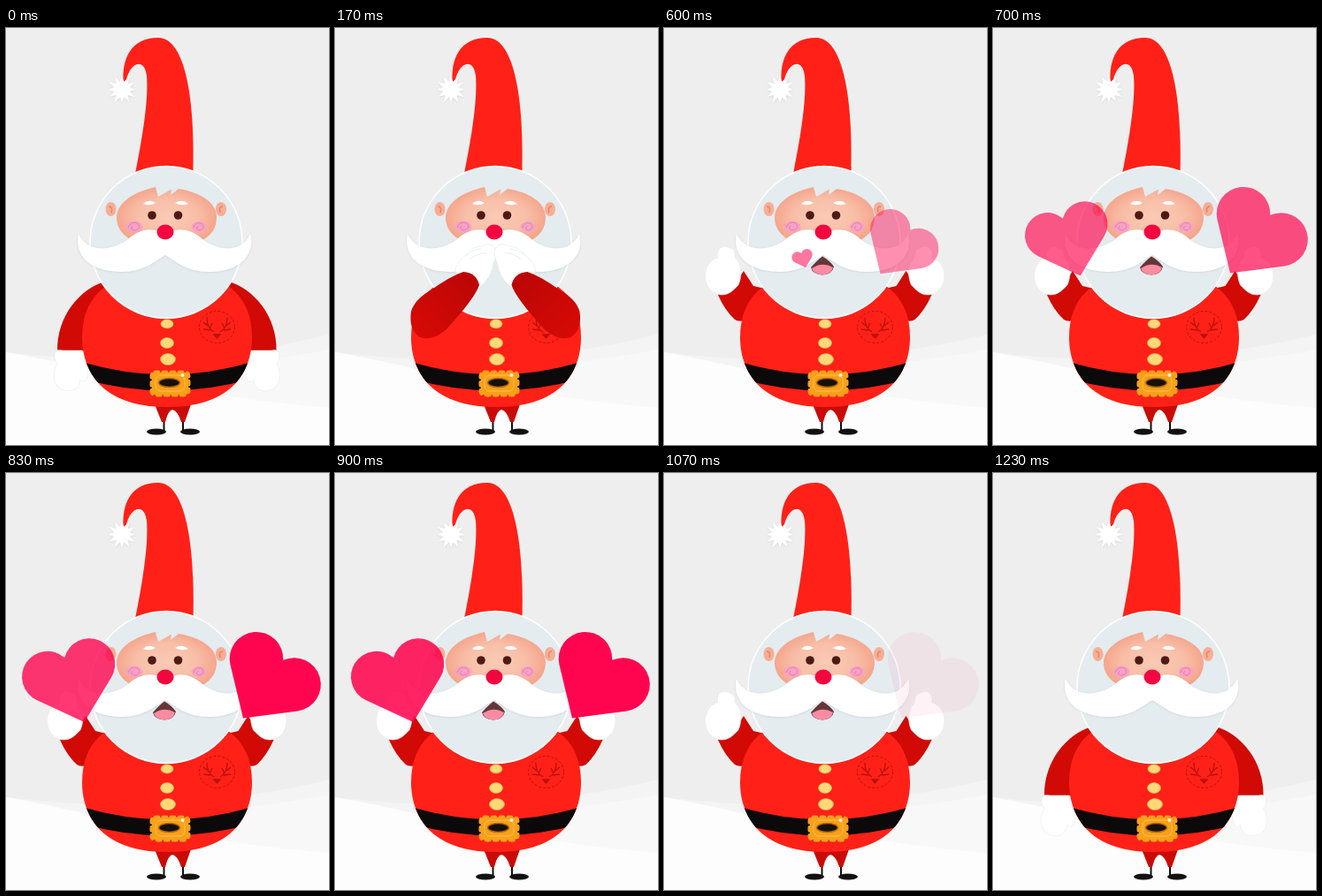
These frames come from a looping animation (365 px wide and 472 px high, 1810 ms). An HTML page:

```html
<!DOCTYPE html>
<html lang="en">
<head>
<meta charset="utf-8">
<title>Santa blowing kisses</title>
<style>
  html, body { margin: 0; width: 100%; height: 100%; overflow: hidden; background: #eee; }
  svg { display: block; width: 365px; height: 472px; }
  .hand { fill: #fff; stroke: #e6e9ea; stroke-width: .6; }
</style>
</head>
<body>
<svg viewBox="0 0 365 472">
  <defs>
    <radialGradient id="skin">
      <stop offset="0" stop-color="#fac9b4"/>
      <stop offset=".6" stop-color="#f8bfa8"/>
      <stop offset="1" stop-color="#f5a68d"/>
    </radialGradient>
    <linearGradient id="sleeve" x1="0" y1="1" x2="1" y2="0">
      <stop offset="0" stop-color="#d90a05"/>
      <stop offset="1" stop-color="#b80606"/>
    </linearGradient>
    <filter id="soft" x="-20%" y="-20%" width="140%" height="140%">
      <feDropShadow dx="0" dy=".5" stdDeviation="1" flood-opacity=".12"/>
    </filter>
    <path id="torso" d="M86 350C86 300 120 275 182 275C244 275 278 300 278 350C278 385 259 429 182 429C105 429 86 385 86 350Z"/>
    <clipPath id="torsoClip"><use href="#torso"/></clipPath>
    <!-- unit heart with its tip at the origin -->
    <path id="heart" d="M0 0L-1.035-.932A.68.68 0 1 1 0-1.792A.68.68 0 1 1 1.035-.932Z" fill="#ff054f"/>
    <!-- left arms, mirrored for the right side -->
    <g id="downArm">
      <path d="M112 287C84 295 57 326 58 366L95 374L125 330Z" fill="#d10a05"/>
      <path class="hand" d="M55 369Q56 363 64 365L86 365Q93 367 90 378Q95 390 91 398Q87 403 84 398Q83 410 71 411Q54 410 54 393Q55 384 58 379Q54 376 55 369Z"/>
    </g>
    <g id="raisedArm">
      <path d="M61 302L80 290L90 275L101 292L118 296L112 325Q86 335 80 330Q69 320 61 302Z" fill="#d10a05"/>
      <path class="hand" d="M61 260C58 250 67 244 74 249C81 250 79 256 81 261C89 268 88 282 84 291C78 297 74 302 65 302C51 301 45 288 47 276C49 266 55 261 61 260Z"/>
    </g>
    <g id="kissArm">
      <path class="hand" d="M136 276Q136 265 147 258Q154 247 166 247Q174 242 180 248Q185 255 179 266Q178 281 163 294Z"/>
      <path d="M147 258Q157 250 165 250M152 262Q162 254 171 255" fill="none" stroke="#eceff0"/>
      <path d="M145 276Q160 277 163 291Q158 306 126 341Q110 355 96 350Q83 342 86 321Q90 307 108 297Q130 281 145 276Z" fill="url(#sleeve)"/>
    </g>
  </defs>

  <rect width="365" height="472" fill="#eee"/>
  <path d="M0 367Q190 390 365 347V472H0Z" fill="#f4f4f4"/>
  <path d="M0 395Q230 390 365 364V472H0Z" fill="#f8f8f8"/>
  <path d="M0 367C90 382 190 415 365 430V472H0Z" fill="#fdfdfd"/>

  <g id="down"><use href="#downArm"/><use href="#downArm" transform="translate(363.5) scale(-1 1)"/></g>
  <g id="raised"><use href="#raisedArm"/><use href="#raisedArm" transform="translate(363.5) scale(-1 1)"/></g>

  <!-- legs -->
  <path d="M178.500 444V456M200 444V456" stroke="#111" stroke-width="2"/>
  <path d="M168 426L176 446H180Q183 433 188 432Q194 433 198 446H202L209 426Z" fill="#c90b08"/>
  <ellipse cx="170" cy="457" rx="11" ry="3.5" fill="#111"/>
  <ellipse cx="208" cy="457" rx="11" ry="3.5" fill="#111"/>

  <!-- body -->
  <use href="#torso" fill="#ff2117"/>
  <path d="M84 387Q182 416 280 387" fill="none" stroke="#0b0909" stroke-width="18" clip-path="url(#torsoClip)"/>
  <rect x="165" y="390" width="41" height="25" rx="4" fill="#f9a01b"/>
  <rect x="165" y="390" width="41" height="25" rx="4" fill="none" stroke="#f9a01b" stroke-width="5" stroke-linecap="round" stroke-dasharray="3 6"/>
  <rect x="169" y="393" width="33" height="18" rx="6" fill="none" stroke="#ffc14a"/>
  <ellipse cx="184.500" cy="401.500" rx="12" ry="5" fill="#15100a" stroke="#b86a0c" stroke-width="1.500"/>
  <circle cx="199.500" cy="393" r="2" fill="#fff3d6"/>
  <g fill="#ffd978" stroke="#f0b64e" stroke-width=".6">
    <ellipse cx="182" cy="335" rx="7" ry="5"/>
    <ellipse cx="182" cy="356.500" rx="7.500" ry="6"/>
    <ellipse cx="183" cy="375" rx="8.500" ry="6.500"/>
  </g>
  <g fill="none" stroke="#b9110d" stroke-width="1.300">
    <ellipse cx="238.500" cy="338.500" rx="20" ry="18" stroke-width="1" stroke-dasharray="3 2"/>
    <path id="antler" d="M235 344Q227 340 227 328M231 342L223 341M228 337L223 333M230 340L233 334"/>
    <use href="#antler" transform="translate(477) scale(-1 1)"/>
    <path d="M235 347L238.500 351L242 347Z" fill="#b9110d"/>
  </g>

  <!-- hat -->
  <path d="M146 165C156 115 161 78 159 54C157 38 147 37 140 48Q136 55 135 64H133C130 34 142 11 172 11C200 11 214 70 211.500 165Z" fill="#ff2117"/>
  <path id="pom" fill="#fff" filter="url(#soft)"/>

  <!-- head -->
  <circle cx="181" cy="242.500" r="86" fill="#e4ecef" stroke="#fff" stroke-width="1.500"/>
  <g fill="#f7ae94">
    <ellipse cx="118.500" cy="205" rx="6" ry="8"/>
    <ellipse cx="243" cy="205" rx="6" ry="8"/>
    <path d="M116 202Q121 202 119 209M245 202Q240 202 242 209" fill="none" stroke="#e58468" stroke-width="1.500"/>
  </g>
  <path d="M125 213C127 196 146 185 169 180L172 191L187 182.500L186 189L195 182C219 186 238 197 238 214C238 238 215 248 181 248C148 248 124 236 125 213Z" fill="url(#skin)"/>
  <path d="M155 199Q161 193 169 198Q163 202 155 199ZM191 198Q199 193 206 199Q198 202 191 198Z" fill="#fff"/>
  <circle cx="165" cy="212" r="4.800" fill="#4d1a14"/>
  <circle cx="194.500" cy="212" r="4.800" fill="#4d1a14"/>
  <g fill="#f5a3c3">
    <ellipse cx="145" cy="225" rx="9.500" ry="6.500"/>
    <ellipse cx="218" cy="225" rx="8.500" ry="6"/>
    <path d="M138 226Q141 218 149 221Q154 227 146 229Q139 228 143 224M212 226Q214 219 221 221Q226 226 219 229Q213 228 217 224" fill="none" stroke="#ee78b8" stroke-width="1"/>
  </g>
  <path d="M180 234C165 224 150 228 138 239C122 252 92 256 82 233C78 250 86 275 130 276C156 276 168 264 180 257C192 264 204 276 230 276C272 275 281 250 276 233C266 256 238 252 222 239C210 228 195 224 180 234Z" fill="#fff" filter="url(#soft)"/>
  <ellipse cx="180" cy="231" rx="9.500" ry="8.500" fill="#f5053f"/>

  <text id="pout" x="183.500" y="274.500" text-anchor="middle" font-family="Open Sans, sans-serif" font-size="17" font-weight="600" fill="#a3a9ab">3</text>
  <g id="mouth">
    <path d="M166 271Q173 263 179 258.500Q187 263 192 270Q190 279 179 279.500Q168 279 166 271Z" fill="#653638"/>
    <path d="M167 272Q179 264 191 271Q189 279 179 279.500Q169 279 167 272Z" fill="#fb8ba3"/>
  </g>

  <g id="kiss"><use href="#kissArm"/><use href="#kissArm" transform="translate(362.500) scale(-1 1)"/></g>
  <use id="leftHeart" href="#heart"/>
  <use id="rightHeart" href="#heart"/>
</svg>
<script>
const LOOP = 1810, STEP = 100 / 3;
const $ = id => document.getElementById(id);
const clamp = x => Math.min(1, Math.max(0, x));
const lerp = (a, b, k) => a + (b - a) * k;
const show = (id, on) => $(id).setAttribute('display', on ? 'inline' : 'none');

// spiky pompom
const spikes = Array.from({ length: 24 }, (_, i) => {
  const r = i % 2 ? 9 : 15 + i % 3, a = i * Math.PI / 12;
  return `${131 + r * Math.cos(a)} ${69.5 + r * Math.sin(a)}`;
});
$('pom').setAttribute('d', `M${spikes.join('L')}Z`);

// A heart grows from the mouth to its resting place, tip first.
function heart(id, k, from, to, size, angle, alpha) {
  const x = lerp(from[0], to[0], k), y = lerp(from[1], to[1], k);
  $(id).setAttribute('transform', `translate(${x} ${y}) rotate(${angle}) scale(${size * k})`);
  $(id).setAttribute('opacity', k > 0 ? clamp(alpha) : 0);
}

// Both arms swing about the left shoulder; the right one is its mirror.
function swing(id, angle, y) {
  $(id + 'Arm').setAttribute('transform', `rotate(${angle} 107 ${y})`);
}

function draw(time) {
  const n = Math.floor(time % LOOP / STEP + 0.11);
  const kissing = n >= 5 && n < 12, raised = n >= 12 && n < 35;

  show('kiss', kissing);
  show('raised', raised);
  show('down', !kissing && !raised);
  show('pout', n >= 12 && n < 14);
  show('mouth', n >= 14 && n < 33);

  swing('down', n >= 1 && n < 3 ? 18 : n >= 3 && n < 5 ? 40 : n === 35 ? 25 : n === 36 ? 10 : 0, 300);
  swing('raised', n === 33 ? -15 : n === 34 ? -38 : 0, 310);

  const fade = Math.max(0, n - 27);
  heart('rightHeart', clamp((n - 15) / 4), [174, 280], [268, 277.5], 44.5, 34.5,
    Math.min(1, 0.2 + 0.083 * (n - 15)) - 0.19 * fade);
  heart('leftHeart', clamp((n - 17) / 4.5), [180.5, 268], [88.5, 282], 42.6, -17,
    Math.min(0.87, 0.51 + 0.036 * (n - 17)) - 0.23 * fade);
}

function tick() {
  draw(performance.now());
  requestAnimationFrame(tick);
}
tick();
</script>
</body>
</html>
```
